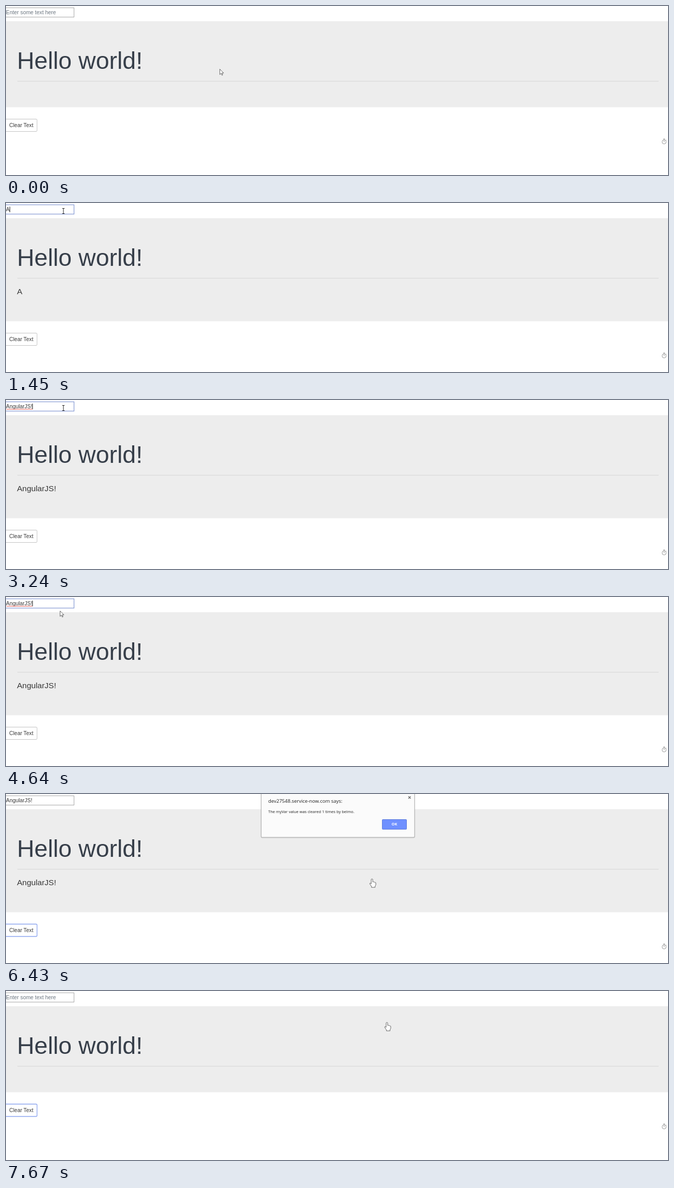
An HTML page for the animation above (8510 ms loop, 1280 by 328 pixels).

```html
<!DOCTYPE html>
<html lang="en">
<head>
<meta charset="utf-8">
<title>Hello world</title>
<style>
  html, body { margin: 0; width: 100%; height: 100%; overflow: hidden; background: #fff; }
  svg { display: block; width: 1280px; height: 328px; }
  text { font-family: "Liberation Sans", Arial, sans-serif; font-size: 10.4px; fill: #3a3a3a; white-space: pre; }
  .heading { font-size: 46.5px; fill: #373f4a; }
  .lead { font-size: 15.5px; fill: #363636; }
  .hint { fill: #6c7680; }
  .field { fill: #fff; stroke: #a8a8a8; }
  .field.focus { stroke: #8c9fd6; stroke-width: 1.3; }
  .button { fill: #fff; stroke: #c2c2c2; }
  .button.focus { stroke: #8aa3ee; stroke-width: 1.3; }
  .wave { fill: none; stroke: #e0453c; stroke-width: .8; }
  .dialog text { font-family: "Open Sans", "Noto Sans", sans-serif; }
  .dialog .title { font-size: 9.5px; fill: #222; }
  .dialog .note { font-size: 7.6px; fill: #222; }
  .dialog .label { font-size: 7.4px; font-weight: 700; fill: #fff; text-anchor: middle; }
  .ok { fill: #6f90ff; stroke: #5f7cdb; }
  .ok.down { fill: #5b7cf0; stroke: #4a66c4; }
  .pointer { fill: #fff; stroke: #333; stroke-width: .75; stroke-linejoin: round; }
  .line { fill: none; stroke: #888; stroke-width: .9; }
</style>
</head>
<body>
<svg viewBox="0 0 1280 328">
  <rect id="field" class="field" x="-1.5" y="3.5" width="133" height="18"/>
  <text id="hint" class="hint" x="0" y="16.3">Enter some text here</text>
  <text id="typed" x="0" y="16.3"></text>
  <path id="wave" class="wave"/>
  <rect id="caret" y="7" width="1" height="11" fill="#222"/>

  <rect id="band" y="29.5" width="1280" height="167" fill="#ededed"/>
  <text class="heading" x="21.2" y="122.3">Hello world!</text>
  <rect x="22" y="145.5" width="1240" height="1" fill="#d6d6d6"/>
  <text id="lead" class="lead" x="21.2" y="177.3"></text>

  <g id="below">
    <rect id="button" class="button" x="-2" y="219.5" width="62" height="24" rx="2"/>
    <text x="6.3" y="235.2">Clear Text</text>
    <g class="line">
      <circle cx="1272.5" cy="263.8" r="3.9"/>
      <path d="M1272.5 264.2V261.5M1272.5 259.9V258M1270.8 258H1274.2M1275.6 259.7L1276.8 260.8"/>
    </g>
  </g>

  <g id="dialog" class="dialog">
    <rect x="492.5" y="-20" width="298.5" height="105.6" rx="3" fill="#000" opacity=".16"/>
    <rect x="493.5" y="-20" width="296.5" height="104" rx="2" fill="#fbfbfb" stroke="#b2b2b2"/>
    <text class="title" x="507" y="17">dev27548.service-now.com says:</text>
    <text class="note" x="507" y="37">The myVar value was cleared 1 times by belmo.</text>
    <path d="M778 4.5L782.5 9M782.5 4.5L778 9" fill="none" stroke="#666" stroke-width="1.3"/>
    <rect id="ok" class="ok" x="727.5" y="49.5" width="47" height="19" rx="1"/>
    <text class="label" x="751" y="61.3">OK</text>
  </g>

  <g id="arrow" class="pointer">
    <path d="M.4 .5V11L2.9 8.7L4.6 12.4L6.1 11.7L4.5 8.1H7.8Z"/>
  </g>
  <g id="beam" fill="none" stroke="#222">
    <path d="M-2.3 -4.5H2.3M-2.3 5.5H2.3M0 -4.5V5.5"/>
  </g>
  <g id="hand" class="pointer">
    <path d="M-1.5 1.3Q-1.5 0 0 0T1.5 1.3V5.8Q3 5 4 6.2Q5.4 5.6 6 6.9Q7.4 6.6 7.4 8V11.5L6 14V16.3H-1V14.3L-4.3 9.5Q-4.5 7.6 -2.8 8.3L-1.5 9.5Z"/>
  </g>
</svg>
<script>
const LOOP = 8510;
const FOCUS = 1230, BLUR = 5250, OPEN = 5420, PRESS = 7270, CLOSE = 7440, CLEAR = 7590;
const BLINK = 530;

// bursts of typing, one key every `gap` ms
const BURSTS = [
  { text: "Angular", at: 1450, gap: 130 },
  { text: "JS", at: 2630, gap: 150 },
  { text: "!", at: 3240, gap: 1 }
];
// pointer moves, each a curve from where the last one ended
const HOME = [413, 122];
const MOVES = [
  { at: 440, span: 620, steps: 9, bend: [230, 60], to: [111, 15] },
  { at: 4640, span: 533, steps: 8, bend: [30, 150], to: [36.5, 260.5] },
  { at: 5800, span: 920, steps: 13, bend: [756, 329], to: [736.5, 61] }
];
const KEYS = BURSTS.flatMap(b => [...b.text].map((char, i) => ({ char, at: b.at + i * b.gap })));

const ui = {};
for (const el of document.querySelectorAll("[id]")) ui[el.id] = el;

const show = (el, on) => el.setAttribute("visibility", on ? "visible" : "hidden");
const move = (el, x, y) => el.setAttribute("transform", `translate(${x} ${y})`);
const setText = (el, s) => { if (el.textContent !== s) el.textContent = s; };
const clamp = v => Math.min(1, Math.max(0, v));
const ease = p => p * p * (3 - 2 * p);

// 0 before `at`, then n equal jumps spread over `span`, ending at 1
function stepped(t, at, span, n) {
  return clamp((Math.floor((t - at) * (n - 1) / span + 1e-6) + 1) / n);
}

function pointerAt(t) {
  let pos = HOME;
  for (const { at, span, steps, bend, to } of MOVES) {
    if (t < at) break;
    const p = ease(stepped(t, at, span, steps)), q = 1 - p;
    pos = pos.map((v, i) => q * q * v + 2 * p * q * bend[i] + p * p * to[i]);
  }
  return pos;
}

function render(t) {
  const keys = t < CLEAR ? KEYS.filter(k => k.at <= t) : [];
  const word = keys.map(k => k.char).join("");
  const filled = keys.length > 0;
  setText(ui.typed, word);
  setText(ui.lead, word);
  show(ui.hint, !filled);

  const focused = t >= FOCUS && t < BLUR;
  ui.field.classList.toggle("focus", focused);
  ui.button.classList.toggle("focus", t >= BLUR);
  show(ui.wave, focused && keys.length === KEYS.length);
  show(ui.caret, focused && filled && Math.floor((t - keys.at(-1).at) / BLINK) % 2 === 0);
  ui.caret.setAttribute("x", filled ? ui.typed.getComputedTextLength() : 0);

  const grow = filled ? 33 : 0;
  ui.band.setAttribute("height", 167 + grow);
  move(ui.below, 0, grow);

  const hidden = 1 - stepped(t, OPEN, 150, 3) + stepped(t, CLOSE, 150, 3);
  move(ui.dialog, 0, -15 * hidden);
  ui.dialog.setAttribute("opacity", clamp(1 - hidden * hidden));
  ui.ok.classList.toggle("down", t >= PRESS);

  const [x, y] = pointerAt(t);
  const kind = t >= BLUR || y > 252 ? "hand" : x < 132 && y < 22 ? "beam" : "arrow";
  for (const name of ["arrow", "beam", "hand"]) {
    show(ui[name], name === kind);
    move(ui[name], x, y);
  }
}

let wave = "M1 17.2";
for (let x = 1; x < 50; x += 2) wave += "l1 1.3l1 -1.3";
ui.wave.setAttribute("d", wave);

const start = performance.now();
function tick() {
  render((performance.now() - start) % LOOP);
  requestAnimationFrame(tick);
}
tick();
</script>
</body>
</html>
```
